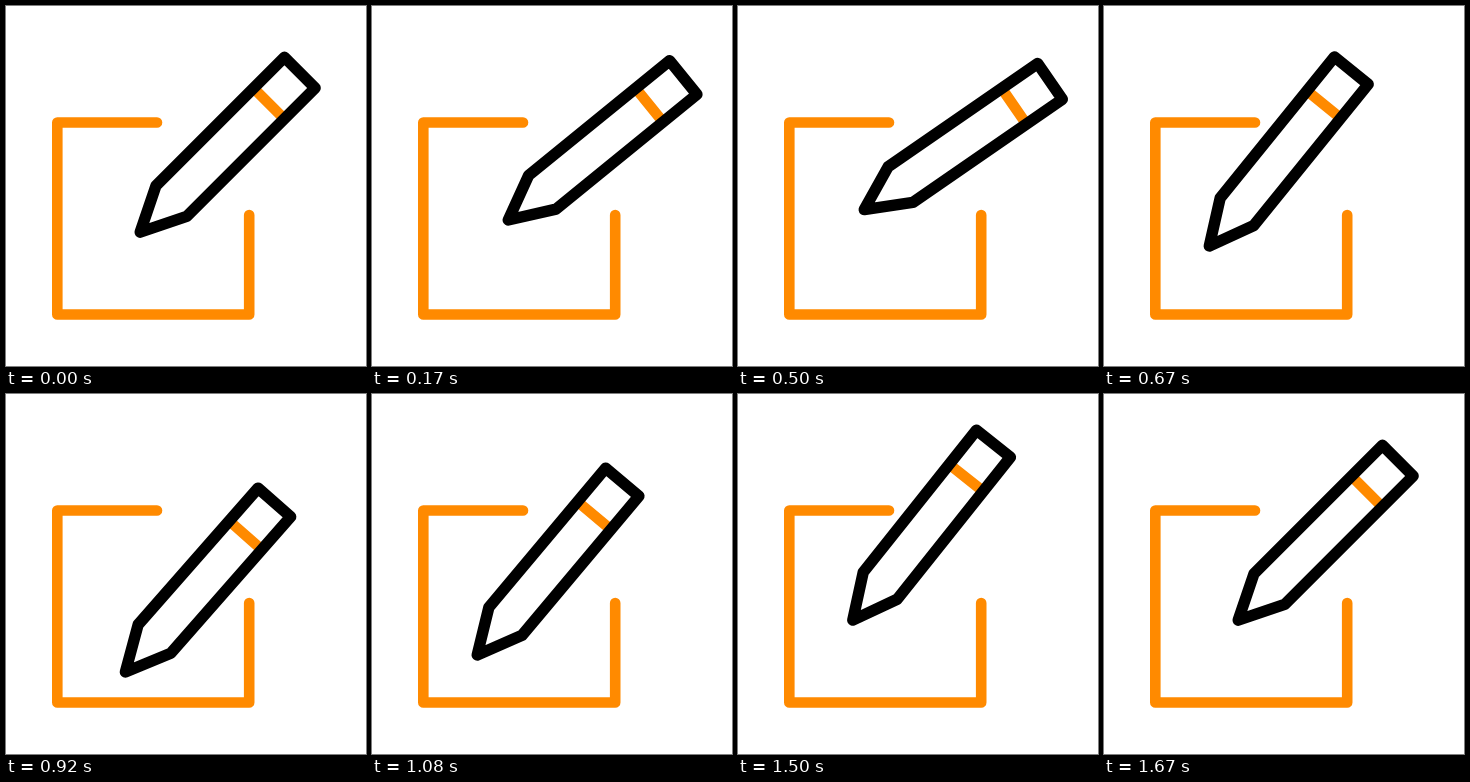
Write an HTML page that moves like this. It is 360 by 360 pixels and loops after 2000 ms.

```html
<!DOCTYPE html>
<html lang="en">
<head>
<meta charset="utf-8">
<title>Pencil</title>
<style>
  html, body { margin: 0; width: 100%; height: 100%; overflow: hidden; background: #fff; }
  svg { display: block; width: 100%; height: 100%; }
  path { fill: none; stroke-linecap: round; stroke-linejoin: round; }
  .orange { stroke: #ff8a00; stroke-width: 10.6; }
  .body { fill: #fff; }
  .line { stroke: #000; stroke-width: 11.4; }
</style>
</head>
<body>
<svg viewBox="0 0 360 360">
  <path class="orange" d="M151 116.5H51.3V308.5H243.2V209"/>
  <g id="pencil">
    <path class="body" d="M0 0L44 -21.7H225.7V21.7H44Z"/>
    <path class="orange" d="M182 -18V18"/>
    <path class="line" d="M0 0L44 -21.7H225.7V21.7H44Z"/>
  </g>
</svg>
<script>
const LOOP = 2000, STEP = 1000 / 12;
const pencil = document.getElementById('pencil');

// Key poses of the writing gesture: tip position and angle of the shaft
const home = { x: 134.2, y: 226.2, angle: 45 };
const path = [
  { at: 0, ...home },
  { at: 5, x: 135, y: 194, angle: 29.4 },      // lean out
  { at: 8, x: 105.3, y: 240, angle: 51 },      // swing in
  { at: 11, x: 119.4, y: 278, angle: 48.7 },   // down stroke
  { at: 13, x: 105.2, y: 261, angle: 50 },     // up stroke
  { at: 16, x: 91.2, y: 231, angle: 58.6 },    // upright
  { at: 20, ...home }
];
const end = path[path.length - 1].at;

// Slope at a key pose; the motion rests at both ends
function slope(i, prop) {
  const a = path[i - 1], b = path[i + 1];
  return a && b ? (b[prop] - a[prop]) / (b.at - a.at) : 0;
}

// Smooth curve through the key poses
function value(prop, k) {
  const i = Math.max(0, path.findIndex(p => p.at >= k) - 1);
  const a = path[i], b = path[i + 1], span = b.at - a.at;
  const u = (k - a.at) / span, v = 1 - u;
  return v * v * (1 + 2 * u) * a[prop] + u * u * (1 + 2 * v) * b[prop] +
    span * u * v * (v * slope(i, prop) - u * slope(i + 1, prop));
}

function draw(ms) {
  // Twelve poses a second, with a small lead for rounded times
  const k = Math.min(end, Math.floor((ms % LOOP + 3.4) / STEP));
  pencil.setAttribute('transform',
    `translate(${value('x', k)} ${value('y', k)}) rotate(${-value('angle', k)})`);
}

const start = performance.now();

function tick() {
  draw(performance.now() - start);
  requestAnimationFrame(tick);
}

draw(0);
requestAnimationFrame(tick);
</script>
</body>
</html>
```
